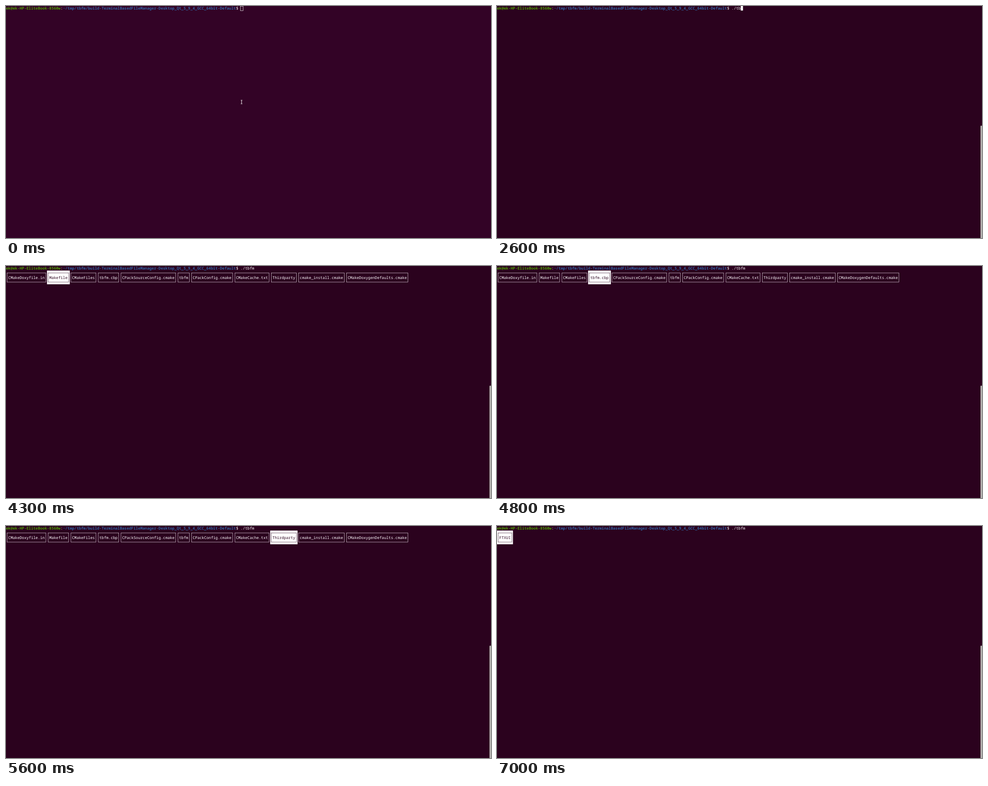
An HTML page for the animation above (8 s loop, 1083 by 517 pixels).

```html
<!DOCTYPE html>
<html>
<head>
<meta charset="utf-8">
<style>
html, body { margin: 0; width: 100%; height: 100%; overflow: hidden; background: #2b021e; }
svg { display: block; }
text {
  font: 8.477px "Noto Sans Mono", "DejaVu Sans Mono", monospace;
  white-space: pre;
  text-rendering: geometricPrecision;
}
.bold { font-weight: 700; }
</style>
</head>
<body>
<svg id="stage" width="1083" height="517" viewBox="0 0 1083 517"></svg>
<script>
// CW and RH are the width and height of one terminal cell.
const LOOP = 8000, CW = 5.086, RH = 10.172, LINE = 0.62;
const DARK = '#2b021e', IDLE = '#330326', WHITE = '#ffffff';
const HOST = 'ek@ek-HP-EliteBook-8560w';
const PATH = '~/tmp/tbfm/build-TerminalBasedFileManager-Desktop_Qt_5_9_4_GCC_64bit-Default';
const START = HOST.length + PATH.length + 3;
const FILES = ['CMakeDoxyfile.in', 'Makefile', 'CMakeFiles', 'tbfm.cbp',
  'CPackSourceConfig.cmake', 'tbfm', 'CPackConfig.cmake', 'CMakeCache.txt',
  'Thirdparty', 'cmake_install.cmake', 'CMakeDoxygenDefaults.cmake'];

// Each track lists [start ms, value].
const typed = [[0, ''], [1600, '.'], [1900, './t'], [2200, './'], [2400, './t'],
  [2600, './tb'], [2800, './tbfm ']];
const caretMode = [[0, 'hollow'], [600, 'solid'], [1200, 'off'], [1600, 'solid'],
  [3300, 'off'], [3600, 'solid'], [3800, 'off']];
const selected = [[0, -1], [3800, 0], [4300, 1], [4800, 3], [4900, 5], [5200, 8],
  [5400, 7], [5600, 8], [6100, 9], [6300, 8], [7000, -1]];
const pointerAt = [[0, [526, 214]], [200, [544, 181]], [400, [544, 180]], [1600, null]];

const at = (track, t) => track.filter(k => k[0] <= t).pop()[1];

function set(el, attrs) {
  for (const k in attrs) el.setAttribute(k, attrs[k]);
}

function add(parent, tag, attrs, content) {
  const el = document.createElementNS('http://www.w3.org/2000/svg', tag);
  set(el, attrs);
  if (content) el.textContent = content;
  parent.appendChild(el);
  return el;
}

const show = (el, on) => set(el, { visibility: on ? 'visible' : 'hidden' });

const stage = document.getElementById('stage');
const back = add(stage, 'rect', { width: 1083, height: 517 });
const bar = add(stage, 'rect', { x: 1079.6, y: 266.5, width: 3.4, height: 253, rx: 1.6, fill: '#b5b1af' });

function label(parent, col, row, str, fill, cls = '') {
  return add(parent, 'text', { x: col * CW, y: row * RH + 8.47, fill, class: cls }, str);
}

label(stage, 0, 0, HOST, '#4e9a06', 'bold');
label(stage, HOST.length, 0, ':', WHITE);
label(stage, HOST.length + 1, 0, PATH, '#3465a4', 'bold');
label(stage, START - 2, 0, '$', WHITE);
const command = label(stage, START, 0, '', WHITE);
const caret = add(stage, 'rect', {});

const pointer = add(stage, 'path', {
  d: 'M-1.8-4H1.8M-1.8 4H1.8M0-4V4', fill: 'none', stroke: '#e4dfe2', 'stroke-width': 1.2
});

function makeEntry(name, col) {
  const g = add(stage, 'g', {});
  const cells = name.length + 2;
  const fill = add(g, 'rect', { x: col * CW, y: RH, width: cells * CW, height: 3 * RH });
  const frame = add(g, 'rect', {
    x: (col + 0.5) * CW, y: 1.53 * RH, width: (cells - 1) * CW, height: 2 * RH,
    fill: 'none', 'stroke-width': LINE
  });
  const text = label(g, col + 1, 2, name, WHITE);
  return { g, fill, frame, text };
}

function paintEntry(e, visible, active) {
  const ink = active ? DARK : WHITE;
  show(e.g, visible);
  set(e.fill, { fill: active ? WHITE : 'none' });
  set(e.frame, { stroke: ink });
  set(e.text, { fill: ink });
}

let col = 0;
const entries = FILES.map(name => {
  const e = makeEntry(name, col);
  col += name.length + 2;
  return e;
});
const folder = makeEntry('FTXUI', 0);

function drawCaret(mode, column) {
  const x = column * CW;
  show(caret, mode !== 'off');
  set(caret, mode === 'hollow'
    ? { x: Math.floor(x) + 0.5, y: 0.5, width: 6, height: 10, fill: 'none', stroke: '#e6dfe4', 'stroke-width': 0.8 }
    : { x, y: 0, width: CW, height: RH, fill: WHITE, stroke: 'none' });
}

function render(t) {
  const focused = t >= 600, str = at(typed, t), pos = at(pointerAt, t), pick = at(selected, t);
  set(back, { fill: focused ? DARK : IDLE });
  show(bar, focused);
  command.textContent = str;
  drawCaret(at(caretMode, t), START + str.length);
  show(pointer, pos);
  if (pos) set(pointer, { transform: `translate(${pos})` });
  entries.forEach((e, i) => paintEntry(e, pick >= 0, i === pick));
  paintEntry(folder, t >= 7000, true);
}

const begin = performance.now();
function tick() {
  render((performance.now() - begin) % LOOP);
  requestAnimationFrame(tick);
}
render(0);
requestAnimationFrame(tick);
</script>
</body>
</html>
```
